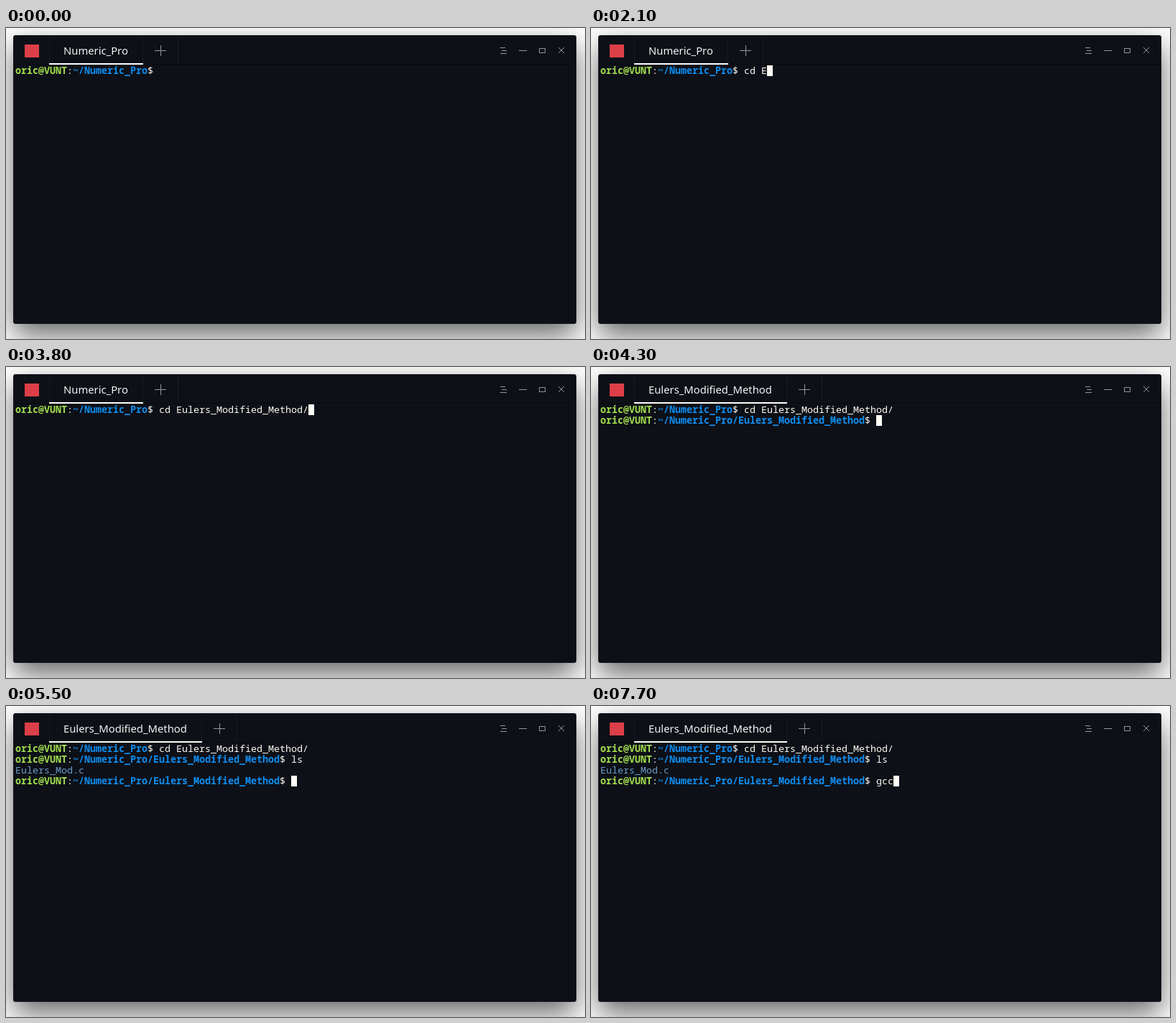
An HTML page that plays this animation: 806x433 px, repeating every 8 s.

```html
<!DOCTYPE html>
<html lang="en">
<head>
<meta charset="utf-8">
<title>Terminal</title>
<style>
  html, body { margin: 0; width: 100%; height: 100%; overflow: hidden; background: #fff; }
  #window {
    position: absolute; left: 10px; top: 10px; width: 784px; height: 402px;
    border-radius: 4px; background: #0d1017;
    box-shadow: 0 16px 40px rgba(0, 0, 0, .6), inset 0 0 0 1px #13161d;
  }
  svg { position: absolute; left: 0; top: 0; display: block; }
  text { white-space: pre; fill: #fffaf3; }
  #screen text { font: 13.3333px "Noto Sans Mono", "DejaVu Sans Mono", monospace; }
  #title { font: 14.8px "Noto Sans", "Open Sans", sans-serif; fill: #f4f4f4; }
  #screen .user { fill: #a3df4e; font-weight: 700; }
  #screen .path { fill: #0f8ef0; font-weight: 700; }
  #screen .file { fill: #6c9bc8; }
  .edge { fill: #171a21; }
  .icon { fill: none; stroke: #96989d; stroke-width: 1; }
</style>
</head>
<body>
<div id="window"></div>
<svg width="806" height="433" viewBox="0 0 806 433">
  <rect x="11" y="50" width="782" height="1" fill="#08090d"/>
  <rect x="26" y="23" width="20" height="18" fill="#dc3f48"/>
  <rect class="edge" x="60" y="12" width="1" height="38"/>
  <rect id="underline" x="60" y="49" width="131" height="2" fill="#fff"/>
  <text id="title" x="80" y="37"></text>
  <g id="tabEnd">
    <rect class="edge" x="190" y="12" width="1" height="37"/>
    <path class="icon" d="M207 31.5h16M215.5 24v15"/>
    <rect class="edge" x="239" y="12" width="1" height="38"/>
  </g>
  <path class="icon" d="M688 27.5h7M690 31.5h7M688 35.5h9M714 31.5h11M742.5 28.5h8v6h-8zM769 27l8 8M777 27l-8 8"/>
  <g id="screen"></g>
  <rect id="cursor" width="8" height="15" fill="#fffdf5"/>
</svg>
<script>
const LOOP = 8000, LEFT = 13, TOP = 52, COL = 8, ROW = 15;
const HOME = "~/Numeric_Pro", DIR = "Eulers_Modified_Method";
const USER = "oric@VUNT";

// time, row, typed text, cursor visible
const steps = [
  [0, 0, "", false],
  [500, 0, "", true],
  [600, 0, "c", true],
  [700, 0, "cd", true],
  [900, 0, "cd ", true],
  [1500, 0, "cd ", false],
  [1700, 0, "cd ", true],
  [2100, 0, "cd E", true],
  [2400, 0, "cd Eulers_M", true],
  [2900, 0, "cd Eulers_M", false],
  [3500, 0, "cd Eulers_M", true],
  [3700, 0, "cd Eulers_Mo", true],
  [3800, 0, `cd ${DIR}/`, true],
  [4300, 1, "", true],
  [4900, 1, "", false],
  [5200, 1, "l", true],
  [5300, 1, "ls", true],
  [5500, 3, "", true],
  [6100, 3, "", false],
  [6700, 3, "", true],
  [7300, 3, "g", true],
  [7600, 3, "gc", true],
  [7700, 3, "gcc", true]
];

const $ = id => document.getElementById(id);

function addText(parent, row, col, content, cls = "") {
  const node = document.createElementNS("http://www.w3.org/2000/svg", "text");
  node.setAttribute("x", LEFT + col * COL);
  node.setAttribute("y", TOP + 12 + row * ROW);
  node.setAttribute("class", cls);
  node.textContent = content;
  parent.append(node);
  return node;
}

function addGroup() {
  const group = document.createElementNS("http://www.w3.org/2000/svg", "g");
  $("screen").append(group);
  return group;
}

function addPrompt(row, path) {
  const group = addGroup();
  const pathCol = USER.length + 1, end = pathCol + path.length;
  addText(group, row, 0, USER, "user");
  addText(group, row, USER.length, ":");
  addText(group, row, pathCol, path, "path");
  addText(group, row, end, "$");
  return { group, col: end + 2, input: addText(group, row, end + 2, "") };
}

const lines = [addPrompt(0, HOME), addPrompt(1, `${HOME}/${DIR}`)];
lines[2] = { group: addGroup() };
addText(lines[2].group, 2, 0, "Eulers_Mod.c", "file");
lines[3] = addPrompt(3, `${HOME}/${DIR}`);

function show(index) {
  const [, row, typed, cursorOn] = steps[index];
  lines.forEach((line, i) => {
    line.group.style.display = i <= row ? "" : "none";
    if (!line.input) return;
    const last = steps.filter(s => s[1] === i).pop()[2];
    line.input.textContent = i < row ? last : typed;
  });

  const cursor = $("cursor");
  cursor.setAttribute("x", LEFT + (lines[row].col + typed.length) * COL);
  cursor.setAttribute("y", TOP + row * ROW);
  cursor.style.display = cursorOn ? "" : "none";

  const moved = row > 0;
  $("title").textContent = moved ? DIR : "Numeric_Pro";
  $("underline").setAttribute("width", moved ? 213 : 131);
  $("tabEnd").setAttribute("transform", `translate(${moved ? 82 : 0} 0)`);
}

const start = performance.now();
let shown = -1;

function tick() {
  const t = (performance.now() - start) % LOOP;
  const index = steps.filter(s => s[0] <= t).length - 1;
  if (index !== shown) show(shown = index);
  requestAnimationFrame(tick);
}
tick();
</script>
</body>
</html>
```
